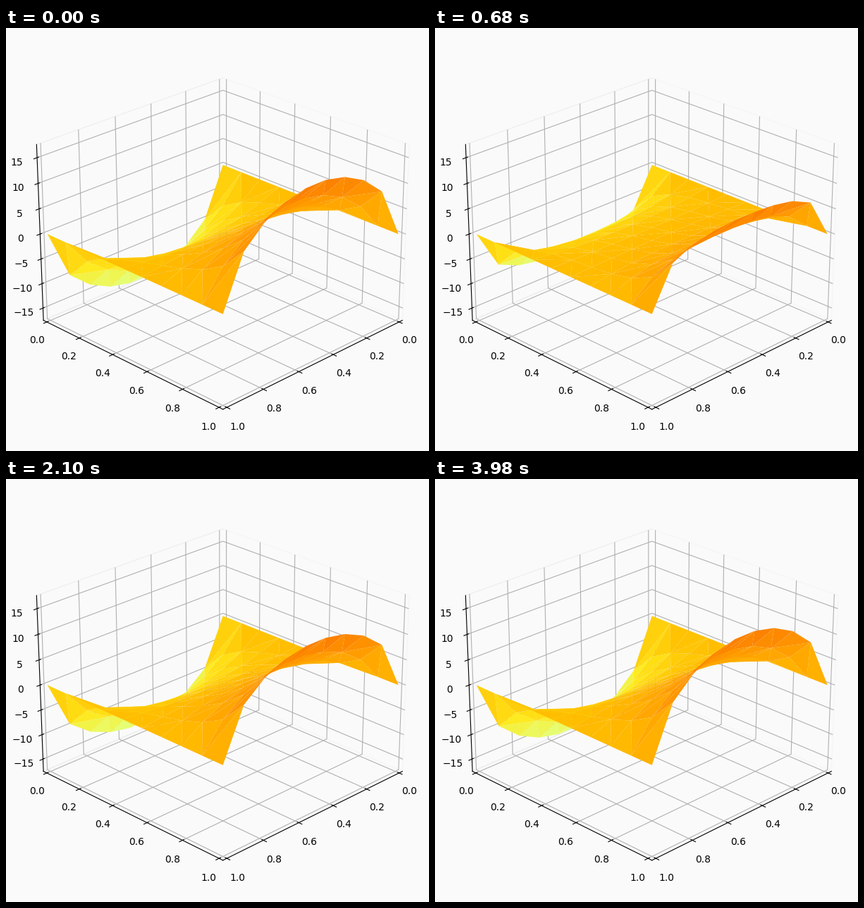
A matplotlib script for the animation above (4 s loop, 600x600 px).

```python
import numpy as np
import matplotlib.pyplot as plt
from matplotlib.animation import FuncAnimation
from matplotlib.tri import Triangulation

N = 10            # nodes per side
STEPS = 200
DT = 0.001
FLUX = 50.0
MARGIN = 1 / 48
BACKGROUND = "#fafafa"


def apply_bounds(u, h):
    """Fixed u = 0 at x = 0, 1; constant normal slope at y = 0, 1."""
    u[:, -1] = (4 * u[:, -2] - u[:, -3] + 2 * h * FLUX) / 3
    u[:, 0] = (4 * u[:, 1] - u[:, 2] - 2 * h * FLUX) / 3
    u[0] = u[-1] = 0


def diffuse():
    """Explicit heat equation, one state per time step."""
    h = 1 / (N - 1)
    u = np.zeros((N, N))
    states = []
    for _ in range(STEPS):
        apply_bounds(u, h)
        states.append(u.copy())
        lap = (u[2:, 1:-1] + u[:-2, 1:-1] + u[1:-1, 2:] + u[1:-1, :-2]
               - 4 * u[1:-1, 1:-1]) / h**2
        u[1:-1, 1:-1] += DT * lap
    return states


states = diffuse()
top = np.abs(states[-1]).max()

axis = np.linspace(0, 1, N)
X, Y = np.meshgrid(axis, axis, indexing="ij")
mesh = Triangulation(X.ravel(), Y.ravel())

fig = plt.figure(figsize=(6, 6), dpi=100, facecolor=BACKGROUND)
ax = fig.add_axes([0.025, 0.025, 0.95, 0.95], projection="3d",
                  facecolor=BACKGROUND)
ax.view_init(elev=25, azim=45)
for a in (ax.xaxis, ax.yaxis, ax.zaxis):
    a.pane.fill = False

surface = None


def draw(i):
    global surface
    if surface is not None:
        surface.remove()
    # the loop opens on the settled surface, then starts over
    surface = ax.plot_trisurf(mesh, states[i - 1].ravel(),
                              cmap="Wistia", linewidth=0)
    ax.set_xlim(-MARGIN, 1 + MARGIN)
    ax.set_ylim(-MARGIN, 1 + MARGIN)
    ax.set_zlim(-top * (1 + 2 * MARGIN), top * (1 + 2 * MARGIN))
    return surface,


anim = FuncAnimation(fig, draw, frames=STEPS, interval=20,
                     repeat=True, repeat_delay=0, blit=False)
plt.show()
```
